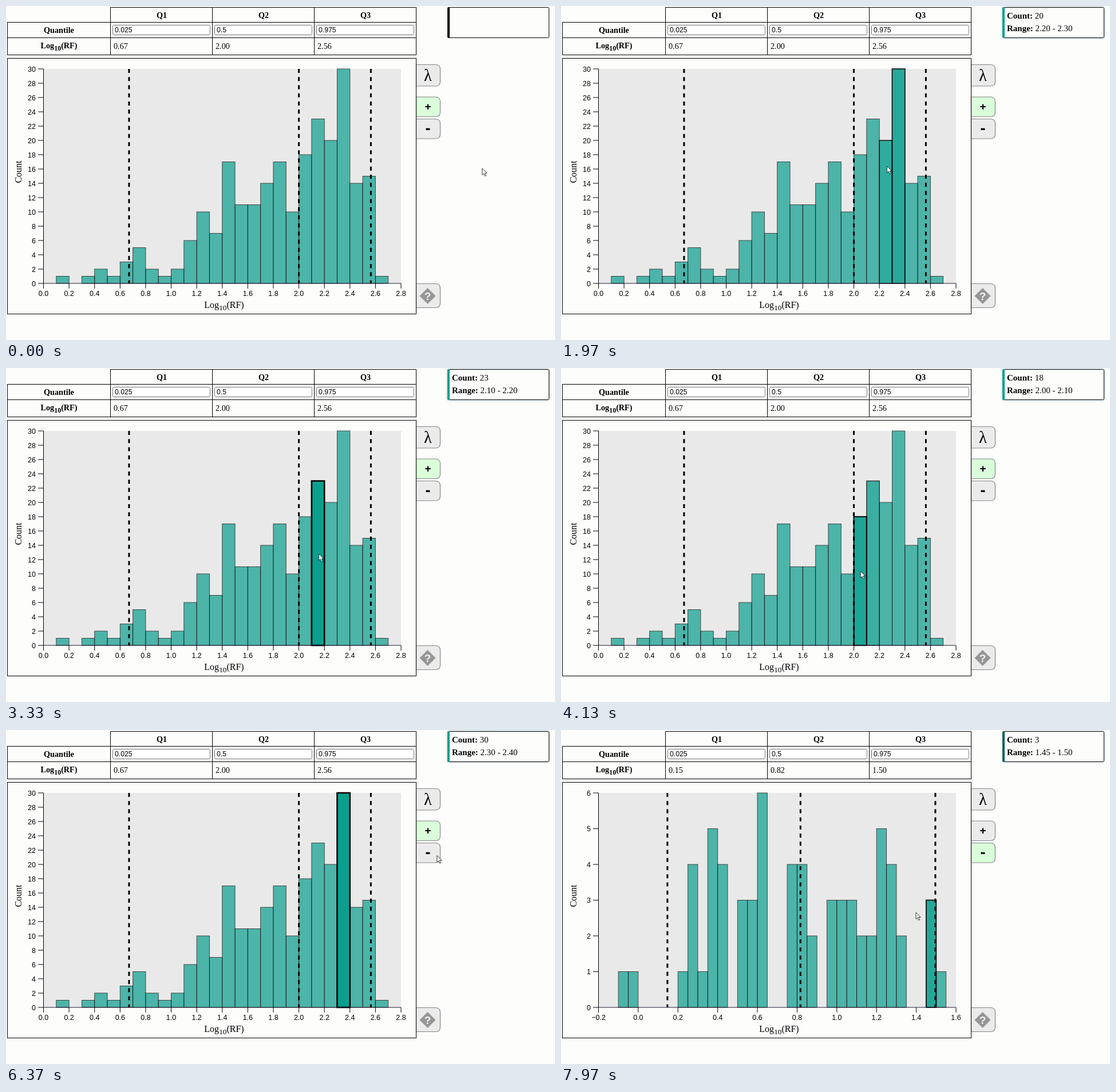
An HTML page for the animation above (8 s loop, 959 by 584 pixels).

```html
<!DOCTYPE html>
<html lang="en">
<head>
<meta charset="utf-8">
<title>Histogram explorer</title>
<style>
  html, body { margin: 0; width: 100%; height: 100%; overflow: hidden; background: #fdfdfc; }
  svg { display: block; width: 959px; height: 584px; }
  text { font: 14.2px "Liberation Serif", serif; }
  .bold { font-weight: bold; }
  .tick { font: 12.5px "Liberation Sans", sans-serif; }
  .field { font: 12.2px "Liberation Sans", sans-serif; }
  .axis { font-size: 16px; }
  .tip { font-size: 15px; }
  .lambda { font-size: 28.5px; }
  .sign { font: bold 19px "Liberation Sans", sans-serif; }
  .minus { font-size: 27px; }
  .mid { text-anchor: middle; }
  .end { text-anchor: end; }
  .line { fill: none; stroke: #000; }
  .button { fill: #ebebeb; stroke: #858585; stroke-width: 1.2; }
  .on { fill: #dafdda; }
  .input { fill: #fff; stroke: #767676; }
  .baseline { fill: none; stroke: #1c1c38; }
  .quantile { stroke: #000; stroke-width: 3; stroke-dasharray: 7.11; }
</style>
</head>
<body>
<svg id="stage" viewBox="0 0 959 584"></svg>
<script>
const LOOP = 8000, SWITCH = 6800, FADE = 500;
const LEFT = 65.5, RIGHT = 690, TOP = 110, BASE = 485;
const TEAL = [11, 159, 142];

// The two data sets shown by the + and - buttons
const views = [
  { min: 0, max: 2.8, top: 30, yStep: 2, start: 0.1, bin: 0.1, marks: [0.67, 2, 2.564],
    counts: [1, 0, 1, 2, 1, 3, 5, 2, 1, 2, 6, 10, 7, 17, 11, 11, 14, 17, 10, 18, 23, 20, 30, 14, 15, 1] },
  { min: -0.2, max: 1.6, top: 6, yStep: 1, start: -0.1, bin: 0.05, marks: [0.147, 0.817, 1.496],
    counts: [1, 1, 0, 0, 0, 0, 1, 4, 1, 5, 4, 0, 3, 3, 6, 0, 0, 4, 4, 2, 0, 3, 3, 3, 2, 2, 5, 4, 2, 0, 0, 3, 1] }
];

const clamp = v => Math.max(0, Math.min(1, v));
const mix = (a, b, k) => a + (b - a) * k;
const linear = k => k;
const easeIn = k => k * k;
const easeOut = power => k => 1 - (1 - k) ** power;

// Pointer stops, each with the easing that leads to it
const stops = [
  { t: 0, x: 833, y: 284 },
  { t: 830, x: 595, y: 255, ease: easeOut(4) },
  { t: 1970, x: 569.5, y: 280, ease: easeIn },
  { t: 3330, x: 546.5, y: 325, ease: linear },
  { t: 5030, x: 497, y: 389, ease: linear },
  { t: 5650, x: 580, y: 305, ease: easeIn },
  { t: 6370, x: 753, y: 219.5, ease: linear },
  { t: 6700, x: 742, y: 215, ease: linear },
  { t: 7300, x: 742, y: 215, ease: linear },
  { t: 7970, x: 620, y: 319, ease: easeOut(2) }
];

function pointerAt(t) {
  const next = stops.find(s => s.t > t) || stops[stops.length - 1];
  const last = stops[stops.indexOf(next) - 1];
  const k = next.ease(clamp((t - last.t) / (next.t - last.t)));
  return { x: mix(last.x, next.x, k), y: mix(last.y, next.y, k) };
}

const xOf = (view, v) => mix(LEFT, RIGHT, (v - view.min) / (view.max - view.min));
const yOf = (view, v) => mix(BASE, TOP, v / view.top);
const viewAt = t => t < SWITCH ? 0 : 1;

function barUnder(view, { x, y }) {
  const value = mix(view.min, view.max, (x - LEFT) / (RIGHT - LEFT));
  const i = Math.floor((value - view.start) / view.bin);
  return y > yOf(view, view.counts[i] || 0) && y < BASE ? i : -1;
}

// A bar stays selected until another one is entered or the data changes
function traceHovers() {
  const found = [];
  for (let t = 0; t < LOOP; t += 10) {
    const view = viewAt(t), i = barUnder(views[view], pointerAt(t));
    const last = found[found.length - 1];
    if (i < 0 || last && last.view === view && last.i === i) continue;
    if (last && last.view === view) last.end = t;
    found.push({ view, i, start: t, end: view ? LOOP : SWITCH });
  }
  return found;
}
const hovers = traceHovers();

const rect = (x, y, w, h, attrs = 'class="line"') =>
  `<rect x="${x}" y="${y}" width="${w}" height="${h}" ${attrs}/>`;
const line = (x1, y1, x2, y2, cls = 'line') =>
  `<path d="M${x1} ${y1}L${x2} ${y2}" class="${cls}"/>`;
const label = (x, y, str, cls = '', attrs = '') =>
  `<text x="${x}" y="${y}" class="${cls}" ${attrs}>${str}</text>`;
const logLabel = size =>
  `Log<tspan dy="4" style="font-size:${size}px">10</tspan><tspan dy="-4">(RF)</tspan>`;
const number = v => (Math.abs(v) < 1e-9 ? 0 : v).toFixed(1).replace('-', '\u2212');

function table() {
  let out = line(182, 2.5, 717, 2.5) + line(2.5, 28, 2.5, 86) + line(716.5, 2, 716.5, 86) +
    label(92.5, 47, 'Quantile', 'bold mid') + label(92.5, 74, logLabel(12), 'bold mid');
  for (const y of [28.5, 55.5, 85.5]) out += line(2, y, 717, y);
  [0.025, 0.5, 0.975].forEach((quantile, i) => {
    const x = 182.5 + 178 * i;
    out += line(x, 2, x, 86) +
      label(x + 89.5, 21, 'Q' + (i + 1), 'bold mid') +
      rect(x + 4, 33.5, 170, 17, 'rx="2" class="input"') +
      label(x + 7.5, 46, quantile, 'field');
  });
  return out;
}

function chart(view, id) {
  const x = v => xOf(view, v), y = v => yOf(view, v);
  const bars = view.counts.map((count, i) => {
    const from = x(view.start + i * view.bin), to = x(view.start + (i + 1) * view.bin);
    return count ? rect(from, y(count), to - from, BASE - y(count),
      `data-i="${i}" fill="rgb(${TEAL})" stroke="#000"`) : '';
  });
  let out = `<g class="bars">${bars.join('')}</g>` + line(LEFT, TOP, LEFT, BASE) +
    line(LEFT, BASE, RIGHT, BASE, 'baseline');
  for (let v = 0; v <= view.top; v += view.yStep)
    out += line(56, y(v), LEFT, y(v)) + label(52, y(v) + 4.5, v, 'tick end');
  for (let v = view.min; v < view.max + 0.01; v += 0.2)
    out += line(x(v), BASE, x(v), BASE + 9) + label(x(v), 507, number(v), 'tick mid');
  view.marks.forEach((v, i) => {
    out += line(x(v), TOP, x(v), BASE, 'quantile') + label(188 + 178 * i, 75, v.toFixed(2));
  });
  return `<g class="view">${out}</g>`;
}

const button = (y, h, id = '') =>
  `<path id="${id}" class="button" d="M716.5 ${y}h33.5q8.5 0 8.5 8v${h - 16}q0 8 -8.5 8h-33.5z"/>`;

const stage = document.getElementById('stage');
stage.innerHTML =
  table() +
  rect(LEFT, TOP, RIGHT - LEFT, BASE - TOP, 'fill="#e9e9e9"') +
  views.map(chart).join('') +
  label(381, 528, logLabel(13.3), 'axis mid') +
  label(0, 0, 'Count', 'axis mid', 'transform="translate(27 290)rotate(-90)"') +
  button(102.5, 37.5) + label(737, 131, 'λ', 'lambda mid') +
  button(159, 34.5, 'plus') + label(737, 182, '+', 'sign mid') +
  button(197.5, 34.5, 'minus') + label(737, 223, '-', 'sign minus mid') +
  button(485.5, 42) +
  '<path d="M736.5 493l14 14l-14 14l-14 -14z" fill="#969696"/>' +
  label(736.5, 514, '?', 'sign mid', 'fill="#f2f2f2"') +
  rect(2.5, 91.5, 714, 447) +
  '<g id="tip">' + rect(771.5, 2.5, 177, 53, 'rx="2" fill="#fdfdfc" stroke="#000"') +
  '<path id="edge" d="M775 2h-2q-2 0 -2 3v48q0 3 2 3h2z"/></g>' +
  '<g id="info">' +
  label(779, 22, '<tspan class="bold">Count:</tspan> <tspan id="count"></tspan>', 'tip') +
  label(779, 44, '<tspan class="bold">Range:</tspan> <tspan id="range"></tspan>', 'tip') + '</g>' +
  '<path id="pointer" d="M0 0V11.6L2.7 9.2L4.7 13.6L6.6 12.7L4.7 8.5H8.2Z" fill="#fff" stroke="#222" stroke-width=".9"/>';

const get = id => document.getElementById(id);
const groups = [...stage.querySelectorAll('.view')];
const barSets = groups.map(g => [...g.querySelectorAll('.bars rect')]);

const levelOf = (view, i, t) => Math.max(0, ...hovers
  .filter(h => h.view === view && h.i === i)
  .map(h => clamp((t - h.start) / FADE) - clamp((t - h.end) / FADE)));

function paintBars(view, t) {
  const levels = new Map(barSets[view].map(bar => [bar, levelOf(view, +bar.dataset.i, t)]));
  for (const [bar, level] of levels) {
    bar.setAttribute('opacity', mix(0.7, 1, level));
    bar.setAttribute('stroke-width', mix(1, 2.6, level));
  }
  // Strongest highlight last, so that its outline stays on top
  const order = [...barSets[view]].sort((a, b) => levels.get(a) - levels.get(b));
  groups[view].querySelector('.bars').append(...order);
}

function paintTip(view, t) {
  const hover = hovers.find(h => t >= h.start && t < h.end);
  get('info').style.display = hover ? '' : 'none';
  let glow = 0;
  if (hover) {
    const { start, bin, counts } = views[view];
    const from = start + hover.i * bin;
    get('count').textContent = counts[hover.i];
    get('range').textContent = `${from.toFixed(2)} - ${(from + bin).toFixed(2)}`;
    glow = clamp((t - hovers.find(h => h.view === view).start) / FADE);
  }
  get('edge').setAttribute('fill', `rgb(${TEAL.map(c => Math.round(c * glow))})`);
  get('tip').style.filter = glow ? `drop-shadow(0 0 2px rgba(90,130,160,${0.5 * glow}))` : 'none';
}

function render(t) {
  const view = viewAt(t);
  groups.forEach((g, i) => { g.style.display = i === view ? '' : 'none'; });
  get('plus').classList.toggle('on', view === 0);
  get('minus').classList.toggle('on', view === 1);
  paintBars(view, t);
  paintTip(view, t);
  const { x, y } = pointerAt(t);
  get('pointer').setAttribute('transform', `translate(${x} ${y})`);
}

function tick() {
  render(performance.now() % LOOP);
  requestAnimationFrame(tick);
}
tick();
</script>
</body>
</html>
```
